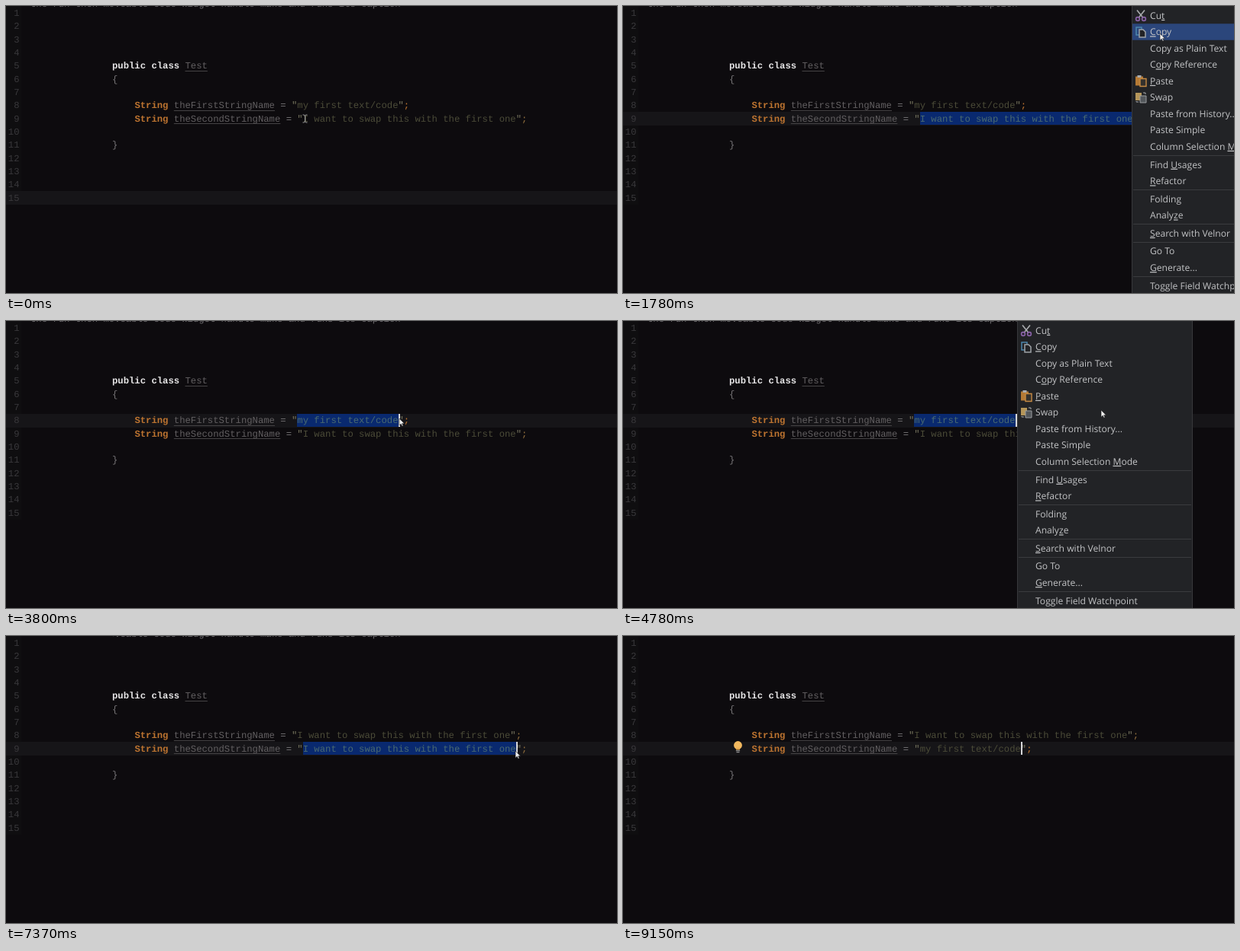
Animation, 800 px wide and 377 px high, one loop 9230 ms. Source, as an HTML page:

```html
<!DOCTYPE html>
<html lang="en">
<head>
<meta charset="utf-8">
<title>Swap two strings</title>
<style>
html, body { margin: 0; width: 100%; height: 100%; overflow: hidden; background: #0d0b0e; }
svg { display: block; width: 800px; height: 377px; }
text { white-space: pre; text-rendering: geometricPrecision; }
.code { font: 12.24px "Liberation Mono", "Courier New", monospace; }
.menu { font: 12.1px "Open Sans", "Noto Sans", sans-serif; fill: #c2c3c5; }
.bold { font-weight: bold; }
.num { fill: #39383b; text-anchor: end; }
.type { fill: #bd7430; }
.name { fill: #625f61; }
.op { fill: #777577; }
.quote { fill: #77755f; }
.dim { fill: #94713f; }
.str { fill: #4b4b38; }
.picked { fill: #4a6a70; }
</style>
</head>
<body>
<svg id="stage" viewBox="0 0 800 377"></svg>
<script>
const NS = 'http://www.w3.org/2000/svg';
const LOOP = 9230, STEP = 80, CW = 7.345;
const FIRST = 'my first text/code';
const SECOND = 'I want to swap this with the first one';
const stage = document.getElementById('stage');

function add(parent, tag, attrs = {}, text) {
  const el = document.createElementNS(NS, tag);
  for (const k in attrs) el.setAttribute(k, attrs[k]);
  if (text !== undefined) el.textContent = text;
  parent.appendChild(el);
  return el;
}
const set = (el, attrs) => { for (const k in attrs) el.setAttribute(k, attrs[k]); };
const show = (el, on) => { el.style.display = on ? '' : 'none'; };
const rect = (p, x, y, width, height, fill) => add(p, 'rect', { x, y, width, height, fill });
const path = (p, d, attrs) => add(p, 'path', { d, fill: 'none', ...attrs });
const rowY = n => 9.5 + 17.32 * (n - 1);
const rowTop = n => Math.round(rowY(n) - 9);
const baseline = n => rowY(n) + 3.6;
const code = (x, n, cls, text) =>
  add(stage, 'text', { x, y: baseline(n), class: 'code ' + cls }, text);
const underline = (x, n, chars) =>
  rect(stage, x, Math.round(baseline(n) + 2.8), chars * CW, 1, '#454345');

// Editor
rect(stage, 0, 0, 800, 377, '#0d0b0e');
rect(stage, 0, 0, 20, 261, '#0f0e10');
const band = rect(stage, 0, 0, 800, 18, '#161518');
const picked = rect(stage, 0, 0, 0, 17, '#09296f');

const strip = add(stage, 'svg', { x: 32, y: 0, width: 500, height: 377 });
const stripText = add(strip, 'text', { y: 1.2, class: 'code', fill: '#6c6a6d' },
  'the run then moveable code widget handle make and runs its caption row');
for (let n = 1; n <= 15; n++) code(17.5, n, 'num', n);

code(139, 5, 'bold', 'public class').setAttribute('fill', '#e6e5e6');
code(139 + 13 * CW, 5, 'name', 'Test');
underline(139 + 13 * CW, 5, 4);
code(139, 6, 'op', '{');
code(139, 11, 'op', '}');

function makeLine(n, name) {
  const x = 168.4;
  const el = code(x, n, '', undefined);
  const span = (cls, text = '') => add(el, 'tspan', { class: cls }, text);
  span('type bold', 'String');
  span('name', ' ' + name);
  span('op', ' = ');
  span('quote', '"');
  const sel = span('picked'), rest = span('str');
  span('quote', '"');
  const end = span('type', ';');
  underline(x + 7 * CW, n, name.length);
  const textX = x + (11 + name.length) * CW;
  return {
    n, textX,
    draw(text, count) {
      sel.textContent = text.slice(0, count);
      rest.textContent = text.slice(count);
      end.setAttribute('class', text === FIRST ? 'type' : 'dim');
    }
  };
}
const lineA = makeLine(8, 'theFirstStringName');
const lineB = makeLine(9, 'theSecondStringName');
const caret = rect(stage, 0, 0, 2, 17, '#d6d6d8');

const bulb = add(stage, 'g', { transform: 'translate(150.5 144)' });
add(bulb, 'circle', { r: 5.4, cy: -0.5, fill: '#f2b95f' });
path(bulb, 'M-3 3H3L2.4 5.5H-2.4Z', { fill: '#e3a84f' });
rect(bulb, -2.6, 6, 5.2, 1.2, '#8f9092');
rect(bulb, -2, 8, 4, 1.2, '#8f9092');

// Context menu; "_" marks the underlined letter
const ITEMS = [
  [12.5, 'Cu_t'], [34, '_Copy'], [55.5, 'Copy as Plain Text'], [77, 'C_opy Reference'],
  [98.5, '_Paste'], [120, 'Swap'], [141.5, 'Paste from History...'], [163, 'Paste Simple'],
  [184.5, 'Column Selection _Mode'], [208.3, 'Find _Usages'], [230, '_Refactor'],
  [253.5, 'Folding'], [275, 'Analy_ze'], [298.5, '_Search with Velnor'],
  [322, 'Go To'], [343.7, '_Generate...'], [367.3, 'Toggle Field Watchpoint']
];
const menu = add(stage, 'g');
rect(menu, 0, 0, 230, 377, '#222326');
rect(menu, 0, 0, 1, 377, '#37383b');
rect(menu, 229, 0, 1, 377, '#37383b');
const hot = rect(menu, 1, 0, 228, 21.5, '#2b467b');
for (const y of [196, 241, 286, 310, 355]) rect(menu, 2, y, 226, 1, '#3a3b3e');
for (const [y, label] of ITEMS) {
  const el = add(menu, 'text', { x: 24, y: y + 4.4, class: 'menu' });
  const [before, after] = label.includes('_') ? label.split('_') : [label, ''];
  add(el, 'tspan', {}, before);
  if (after) {
    add(el, 'tspan', { 'text-decoration': 'underline' }, after[0]);
    add(el, 'tspan', {}, after.slice(1));
  }
}
const icon = y => add(menu, 'g', { transform: `translate(12 ${y})` });
const cut = icon(12.5);
path(cut, 'M-5-7L3 3M5-7L-3 3', { stroke: '#a9abae', 'stroke-width': 1.6 });
for (const x of [-4, 4]) add(cut, 'circle', { cx: x, cy: 4.5, r: 2.4, fill: 'none', stroke: '#8a62a8', 'stroke-width': 1.6 });
const copy = icon(34);
path(copy, 'M-6-6H1V4H-6Z', { stroke: '#4d86ad', 'stroke-width': 1.5 });
path(copy, 'M-2-3H3L6 0V7H-2Z', { fill: '#222326', stroke: '#9fa4a8', 'stroke-width': 1.5 });
const paste = icon(98.5);
rect(paste, -7, -6, 10, 12, '#b57a35');
rect(paste, -4.5, -7.5, 5, 3, '#a9abae');
path(paste, 'M-1-3H7V7H-1Z', { fill: '#34312d', stroke: '#c68a43', 'stroke-width': 1.4 });
const swap = icon(120);
rect(swap, -7, -6, 8, 10, '#b5965a');
path(swap, 'M-1-2H7V7H-1Z', { fill: '#53575b', stroke: '#999c9f' });
path(swap, 'M3-6H6V-4M-3 6H-6V5', { stroke: '#a9abae' });

// Pointers
const beam = path(stage, 'M-2.5-5H-.5L.5-4L1.5-5H3.5M.5-4V4M-2.5 5H-.5L.5 4L1.5 5H3.5',
  { stroke: '#9b9b9c', 'stroke-width': 1 });
const arrow = path(stage, 'M0 0V9.2L2.2 7.2L3.7 10.3L5.1 9.6L3.7 6.7H6.5Z',
  { fill: '#f0f0f0', stroke: '#1a1a1c', 'stroke-width': 0.6 });

// Pointer legs: start, steps, end x, end y
const LEGS = [
  [0, 1, 391, 148], [80, 9, 667, 139.5], [1300, 7, 703, 36], [1940, 8, 382, 123],
  [2580, 4, 381, 130], [2900, 7, 515, 128], [4460, 5, 626, 117], [5280, 8, 384, 152],
  [5920, 4, 389, 148], [6240, 12, 667, 151], [7690, 8, 704, 120], [8420, 7, 815, 190]
];
function pointerAt(t) {
  let i = LEGS.length - 1;
  while (LEGS[i][0] > t) i--;
  const [start, steps, x, y] = LEGS[i];
  const [, , px, py] = LEGS[Math.max(i - 1, 0)];
  const p = Math.min(1, (Math.floor((t - start) / STEP) + 1) / steps);
  const e = p * p * (3 - 2 * p);
  return { x: px + (x - px) * e, y: py + (y - py) * e };
}
const within = (t, ...spans) => spans.some(([a, b]) => t >= a && t < b);

function draw(t) {
  const ptr = pointerAt(t);
  const textA = t < 5280 ? FIRST : SECOND;
  const textB = t < 8420 ? SECOND : FIRST;
  const row = t < 80 ? 15 : within(t, [2900, 6240]) ? 8 : 9;
  const line = row === 8 ? lineA : lineB;
  const text = row === 8 ? textA : textB;

  const dragging = within(t, [80, 1140], [2900, 3800], [6240, 7370]);
  const reach = Math.round((ptr.x - line.textX) / CW);
  const end = dragging ? Math.max(0, Math.min(text.length, reach)) : text.length;
  const count = within(t, [80, 8420]) ? end : 0;
  lineA.draw(textA, row === 8 ? count : 0);
  lineB.draw(textB, row === 9 ? count : 0);

  const y = rowTop(row);
  const x = Math.round(line.textX);
  const endX = Math.round(line.textX + end * CW);
  set(band, { y });
  set(picked, { x, y, width: count ? endX - x : 0 });
  set(caret, { x: endX, y });
  show(caret, row !== 15);
  show(bulb, t >= 9070);

  const left = t < 5280 ? 32 : 140;
  set(strip, { x: left, width: 523 - left });
  set(stripText, { x: 32 - left });
  show(strip, t < 8420);

  const menuX = within(t, [3880, 5280]) ? 516 : 666;
  show(menu, within(t, [1140, 1940], [3880, 5280], [7450, 8420]));
  set(menu, { transform: `translate(${menuX} 0)` });
  const item = ITEMS.find(([mid]) => Math.abs(mid - ptr.y) <= 10.8);
  const lit = item && within(t, [1300, 1940], [5030, 5280], [7690, 8420]);
  show(hot, lit);
  if (lit) set(hot, { y: item[0] - 10.75 });

  const isArrow = within(t, [1140, 1940], [3800, 5280], [7370, 8420]);
  const at = { transform: `translate(${ptr.x} ${ptr.y})` };
  set(arrow, at);
  set(beam, at);
  show(arrow, isArrow);
  show(beam, !isArrow);
}

const began = performance.now();
function tick() {
  draw((performance.now() - began) % LOOP);
  requestAnimationFrame(tick);
}
tick();
</script>
</body>
</html>
```
